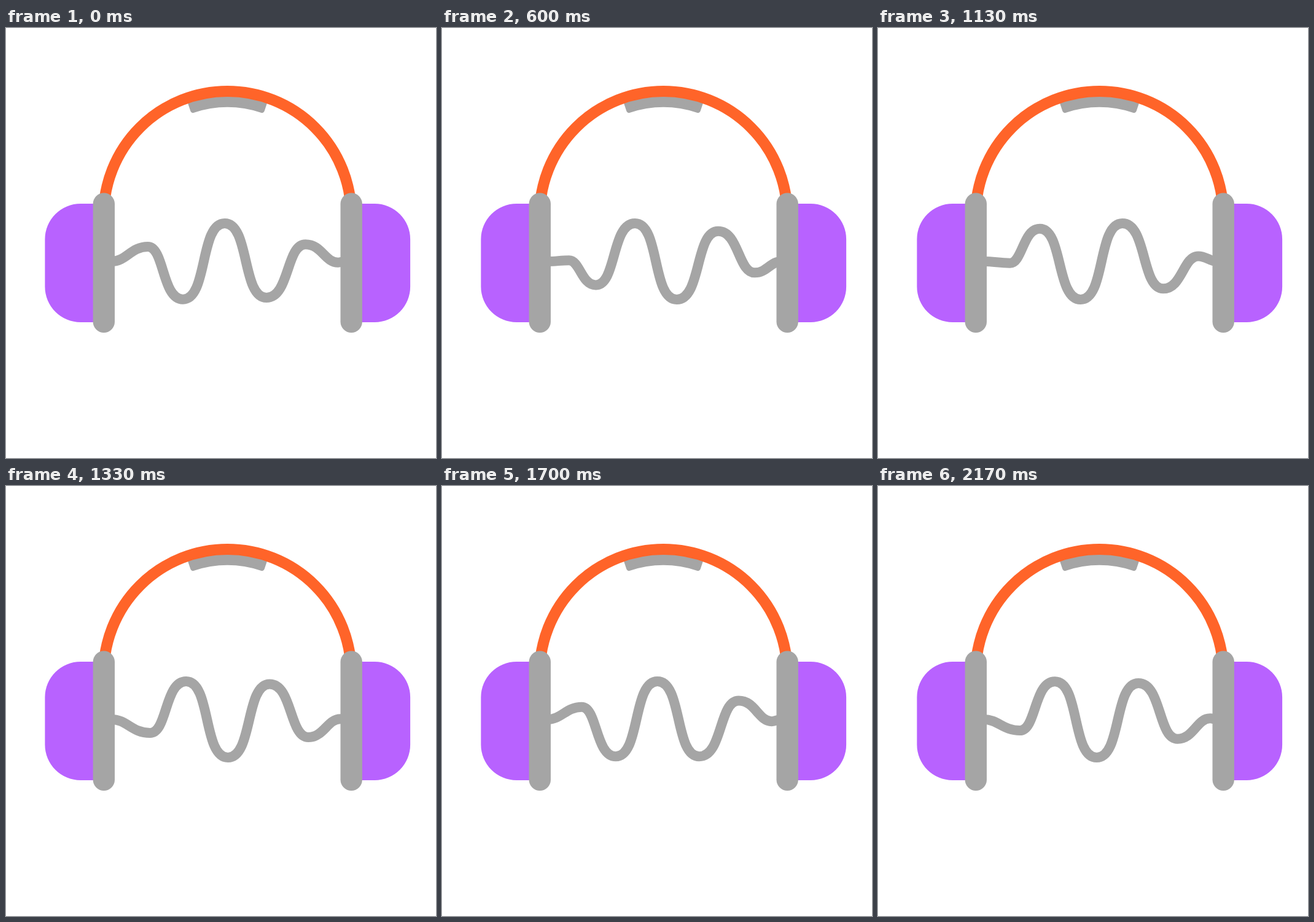
An HTML page for the animation above (2210 ms loop, 700 by 700 pixels).

```html
<!DOCTYPE html>
<html lang="en">
<head>
<meta charset="utf-8">
<title>Headphones</title>
<style>
  html, body { margin: 0; width: 100%; height: 100%; overflow: hidden; background: #fff; }
  svg { display: block; width: 100%; height: 100%; }
</style>
</head>
<body>
<svg viewBox="0 0 700 700">
  <path id="pad" fill="#a5a5a5" stroke="#a5a5a5" stroke-width="8" stroke-linejoin="round"/>
  <path d="M159 304.5A201.5 201.5 0 0 1 562 304.5" fill="none" stroke="#ff6429" stroke-width="18"/>
  <path id="wave" fill="none" stroke="#a5a5a5" stroke-width="16" stroke-linejoin="round"/>
  <g id="cup">
    <path d="M160 286H121.4A58 58 0 0 0 63.4 344V421A58 58 0 0 0 121.4 479H160Z" fill="#b862ff"/>
    <rect x="141.6" y="268.5" width="35.4" height="227.5" rx="17.7" fill="#a5a5a5"/>
  </g>
  <use href="#cup" transform="translate(721.5 0) scale(-1 1)"/>
</svg>
<script>
  const LOOP = 2210, FPS = 30, LAST_STEP = 65, HALF_CYCLE = 13;
  const MID_Y = 380, AMPLITUDE = 62, SPEED = 68 / HALF_CYCLE;
  const wave = document.getElementById('wave');

  const clamp = v => Math.min(1, Math.max(0, v));
  const smooth = v => v * v * (3 - 2 * v);
  const bump = v => Math.sin(Math.PI * clamp(v));

  function drawPad() {
    const point = (r, deg) => {
      const a = deg * Math.PI / 180;
      return `${360.5 + r * Math.sin(a)} ${304.5 - r * Math.cos(a)}`;
    };
    document.getElementById('pad').setAttribute('d',
      `M${point(179.5, -18.3)}A179.5 179.5 0 0 1 ${point(179.5, 18.3)}` +
      `L${point(196, 18.3)}A196 196 0 0 0 ${point(196, -18.3)}Z`);
  }

  // A crest or trough after travelling for `age` steps; it slows and flattens near the cups.
  function extremum(age, sign) {
    const x = 220 + SPEED * age
      + 0.065 * Math.max(0, 13 - age) ** 2
      - 0.031 * Math.max(0, age - 40) ** 2;
    const right = clamp((67 - age) / 31);
    const size = smooth(clamp((age + 9) / 23)) * (0.7 * smooth(right) + 0.3 * right);
    const tilt = 2 * bump((age - 41) / 24) - 3 * bump((age + 12) / 25);
    return { x, y: MID_Y + tilt + sign * AMPLITUDE * size, size };
  }

  function wavePath(step) {
    const points = [{ x: 172, y: MID_Y, size: 0 }];
    for (let k = -6; k <= 5; k++) {
      const age = step + k * HALF_CYCLE;
      if (age > -8.5 && age < 66.5) points.push(extremum(age, k % 2 ? 1 : -1));
    }
    points.push({ x: 552, y: MID_Y, size: 0 });

    const handle = p => 0.4 + 0.2 * p.size;
    return points.slice(1).reduce((d, b, i) => {
      const a = points[i], dx = b.x - a.x;
      return d + `C${a.x + dx * handle(a)} ${a.y} ${b.x - dx * handle(b)} ${b.y} ${b.x} ${b.y}`;
    }, `M${points[0].x} ${points[0].y}`);
  }

  function stepAt(time) {
    const step = Math.min(LAST_STEP, Math.floor((time + 4) * FPS / 1000));
    // Early in the loop every third step is held.
    return step < 24 && step % 3 === 2 ? step - 1 : step;
  }

  function render(time) {
    wave.setAttribute('d', wavePath(stepAt(time % LOOP)));
  }

  drawPad();
  render(0);
  const start = performance.now();
  function tick() {
    render(performance.now() - start);
    requestAnimationFrame(tick);
  }
  requestAnimationFrame(tick);
</script>
</body>
</html>
```
